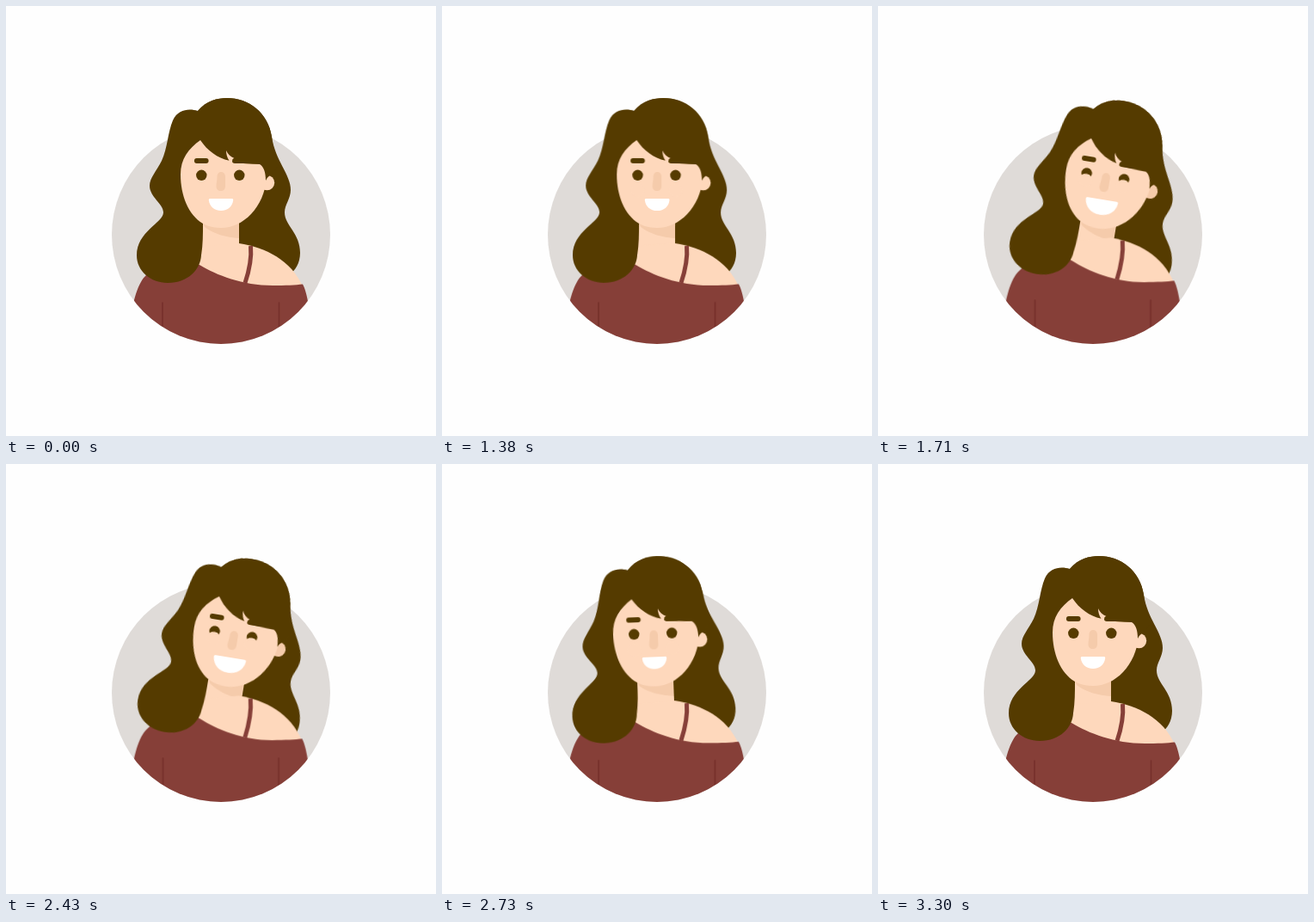
These frames come from a looping animation (500 px wide and 500 px high, 3.63 s). An HTML page without scripts:

```html
<!DOCTYPE html>
<html lang="en">
<head>
<meta charset="utf-8">
<title>Smiling portrait</title>
<style>
  :root {
    --hair: #553b00;
    --skin: #fed8bc;
    --shade: #f5cbab;
    --shirt: #863f38;
    --seam: #76302b;
    --loop: 3630ms infinite both;
    --swing: cubic-bezier(.33, 0, .3, 1);
  }
  html, body { margin: 0; width: 100%; height: 100%; overflow: hidden; background: #fefefe; }
  svg { display: block; width: 100%; height: 100%; }

  .hair { fill: var(--hair); }
  .skin { fill: var(--skin); }
  .shade { fill: var(--shade); }
  .shirt { fill: var(--shirt); }
  .line { fill: none; stroke-linecap: round; }
  .brow { stroke: var(--hair); stroke-width: 5.8; }
  .strap { stroke: var(--shirt); stroke-width: 5; stroke-linecap: butt; }
  .seam { stroke: var(--seam); stroke-width: 1.6; }

  .head { transform-origin: 260px 303px; animation: tilt var(--loop); }
  .sway { transform-origin: 257px 107px; animation: sway var(--loop); }
  .body { transform-origin: 250px 400px; animation: lift var(--loop); }
  .eyes { transform-origin: 249px 197px; animation: blink var(--loop); }
  .lids { animation: squint var(--loop); }
  .mouth { fill: #fff; transform-origin: 250px 224px; animation: grin var(--loop); }
  .ear { animation: shadow var(--loop); }

  @keyframes tilt {
    0%, 37.741% { transform: translate(0, 0) rotate(0deg); animation-timing-function: var(--swing); }
    47.245%, 66.667% { transform: translate(-2.2px, 1.5px) rotate(9.3deg); animation-timing-function: ease-in-out; }
    75.482% { transform: translate(0, 0) rotate(-2.2deg); animation-timing-function: ease-in-out; }
    81.267%, 100% { transform: translate(0, 0) rotate(0deg); }
  }
  /* hair trails behind the head, then settles */
  @keyframes sway {
    0%, 75.482% { transform: rotate(0deg); animation-timing-function: ease-in-out; }
    81.267% { transform: rotate(.9deg); animation-timing-function: ease-out; }
    82.231% { transform: rotate(1.1deg); animation-timing-function: ease-in-out; }
    86.226% { transform: rotate(-.9deg); animation-timing-function: ease-in-out; }
    90.909%, 100% { transform: rotate(0deg); }
  }
  @keyframes lift {
    0%, 37.741% { transform: scale(1); animation-timing-function: var(--swing); }
    46%, 66.667% { transform: scale(.993, 1.052); animation-timing-function: ease-in-out; }
    78%, 100% { transform: scale(1); }
  }
  @keyframes blink {
    0%, 9.917% { transform: scaleY(1); }
    12.397%, 13.223% { transform: scaleY(.12); }
    15.702%, 100% { transform: scaleY(1); }
  }
  @keyframes squint {
    0%, 37.741% { transform: translateY(10px); animation-timing-function: var(--swing); }
    44.077%, 66.667% { transform: translateY(0); animation-timing-function: ease-in-out; }
    74.4%, 100% { transform: translateY(10px); }
  }
  @keyframes grin {
    0%, 37.741% { transform: scale(1); animation-timing-function: var(--swing); }
    44.077%, 66.667% { transform: scale(1.33, 1.28); animation-timing-function: ease-in-out; }
    74.4%, 100% { transform: scale(1); }
  }
  @keyframes shadow {
    0%, 37.741% { fill: var(--skin); animation-timing-function: var(--swing); }
    44.077%, 66.667% { fill: var(--shade); animation-timing-function: ease-in-out; }
    74.4%, 100% { fill: var(--skin); }
  }
</style>
</head>
<body>
<svg viewBox="0 0 500 500">
  <defs>
    <clipPath id="disc"><circle cx="250" cy="266" r="127"/></clipPath>
  </defs>

  <circle cx="250" cy="266" r="127" fill="#dfdbd8"/>

  <g class="head">
    <path class="hair sway" d="M223 122C233 110 246 107 257 107C282 107 305 124 309 152
      C313 180 331 196 331 214C331 224 324 231 324 240C324 255 342 264 342 287
      C342 299 336 308 330 312L260 300L210 240Z"/>
    <path class="skin" d="M222 235H271V290H222Z"/>
    <path class="shade" d="M226 245H271V270C256 269 241 265 231 257Z"/>
  </g>

  <g clip-path="url(#disc)">
    <g class="body">
      <path class="skin" d="M200 300L222 280L271 276C302 281 331 295 345 326L290 345H220Z"/>
      <path class="shirt" d="M144 372C147 342 154 321 163 313C172 304 185 297 215 296L225 301
        C245 313 275 325 310 325C325 325 337 324.500 345 323.500C349 331 352 344 355 372V400H144Z"/>
      <path class="line strap" d="M284.500 279C286 295 282 310 278 322"/>
      <path class="line seam" d="M182 345V385M317.500 345V385"/>
    </g>
  </g>

  <g class="head">
    <circle class="ear" cx="303.500" cy="205.500" r="8.700"/>
    <path class="skin" d="M226 150C205 160 197 180 198 200C200 235 222 258 250 258
      C276 258 300 234 303 200L300 165Z"/>
    <path class="shade" d="M250 193C253.500 193 255 195.500 255 199V209C255 213 253 215 250 215
      C246.500 215 244.500 213 244.500 209.500C244.500 206 245.500 203 245.500 199C245.500 195.500 247 193 250 193Z"/>
    <path class="line brow" d="M221.800 180H232.700M266 180H277"/>
    <g class="hair eyes">
      <circle cx="227.300" cy="196.800" r="6.200"/>
      <circle cx="271.300" cy="196.800" r="6.200"/>
    </g>
    <g class="skin lids">
      <ellipse cx="227.300" cy="204.900" rx="8" ry="7.300"/>
      <ellipse cx="271.300" cy="204.900" rx="8" ry="7.300"/>
    </g>
    <path class="mouth" d="M237 224H263Q264.300 224 264.200 225.500C263.500 233 258 238 250 238
      C242 238 236.500 233 235.800 225.500Q235.700 224 237 224Z"/>
    <path class="hair sway" d="M223 122C233 110 246 107 257 107C282 107 305 124 309 152
      C310 165 314 175 318 183L309 196C306 197 304 199 302 203C302 194 300 187 295 184
      C284 184 273 183 263 181.500L265.500 177C261 175.500 258 172 256 168C256 172 257 176 259.500 179.800
      C246 177 234 168 226 156C212 166 203 178 203 196C203 220 212 243 229 253
      C229 265 229 278 227 290C226 306 212 322 188 322C168 322 152 308 152 290
      C152 262 183 252 183 240C183 230 167 222 167 209C167 200 175 192 181 180
      C188 165 188 147 194 133C200 120 213 119 223 122Z"/>
  </g>
</svg>
</body>
</html>
```
